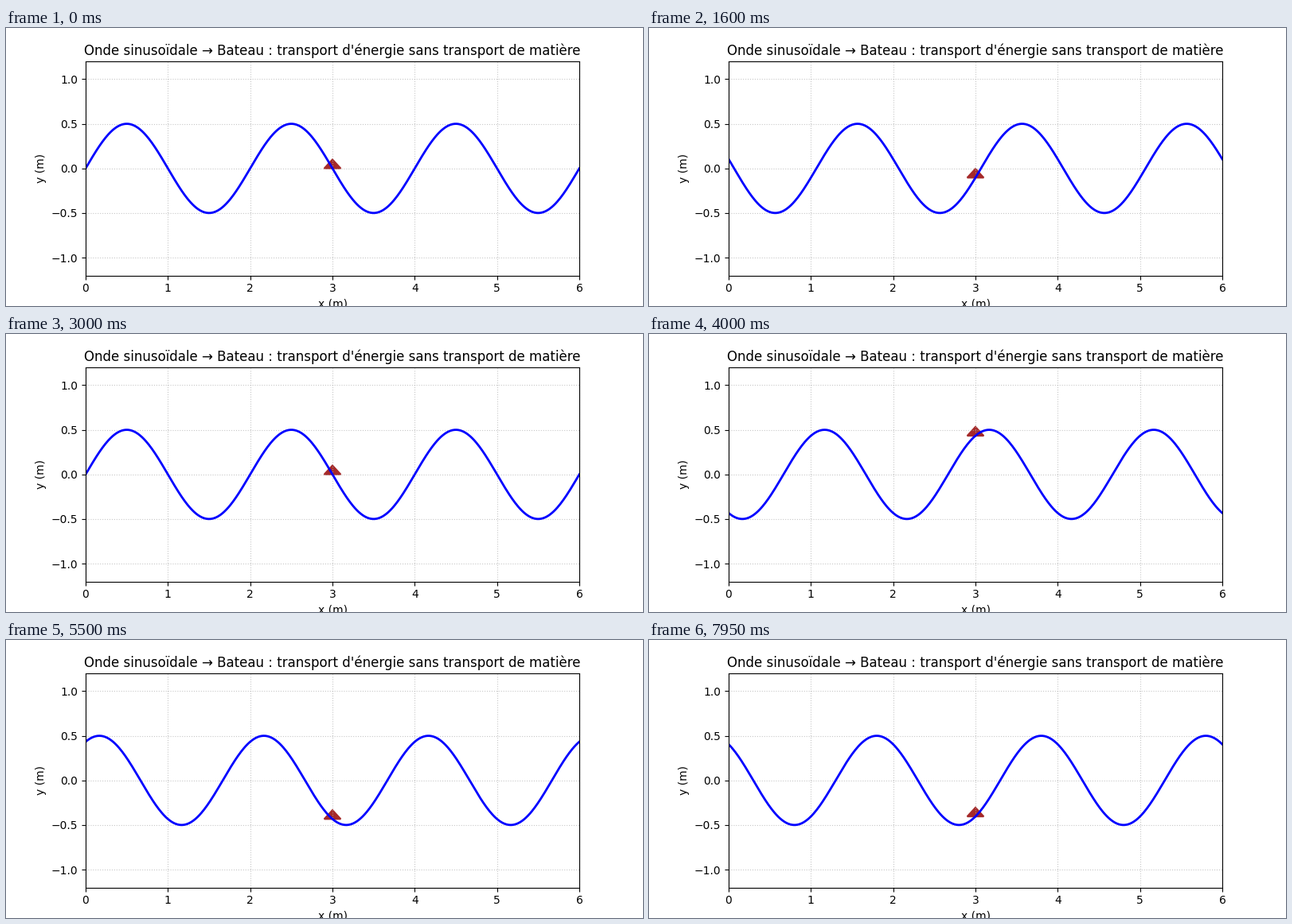
A matplotlib script that plays this animation: 800 px wide and 350 px high, repeating every 8 s.

```python
import numpy as np
import matplotlib.pyplot as plt
from matplotlib.animation import FuncAnimation

plt.rcParams["font.family"] = "DejaVu Sans"

AMP = 0.5          # m
WAVELENGTH = 2.0   # m
PERIOD = 3.0       # s
INTERVAL = 50      # ms
FRAMES = 160
BOAT_X = 3.0
BOAT = np.array([[-0.1, 0.0], [0.1, 0.0], [0.0, 0.1]])


def height(x, t):
    return AMP * np.sin(2 * np.pi * (x / WAVELENGTH - t / PERIOD))


def boat_points(t):
    return BOAT + [BOAT_X, height(BOAT_X, t)]


fig, ax = plt.subplots(figsize=(8, 3.5), dpi=100)
ax.set_xlim(0, 6)
ax.set_ylim(-1.2, 1.2)
ax.set_xlabel("x (m)")
ax.set_ylabel("y (m)")
ax.set_title("Onde sinusoïdale → Bateau : transport d'énergie sans transport de matière")
ax.grid(True, linestyle=":", alpha=0.7)

x = np.linspace(0, 6, 500)
wave, = ax.plot(x, height(x, 0), color="blue", lw=2)
boat = plt.Polygon(boat_points(0), closed=True, color="brown", lw=1.5)
ax.add_patch(boat)


def update(frame):
    t = frame * INTERVAL / 1000
    wave.set_ydata(height(x, t))
    boat.set_xy(boat_points(t))
    return wave, boat


anim = FuncAnimation(fig, update, frames=FRAMES, interval=INTERVAL,
                     repeat=True, repeat_delay=0, blit=False)
plt.show()
```
